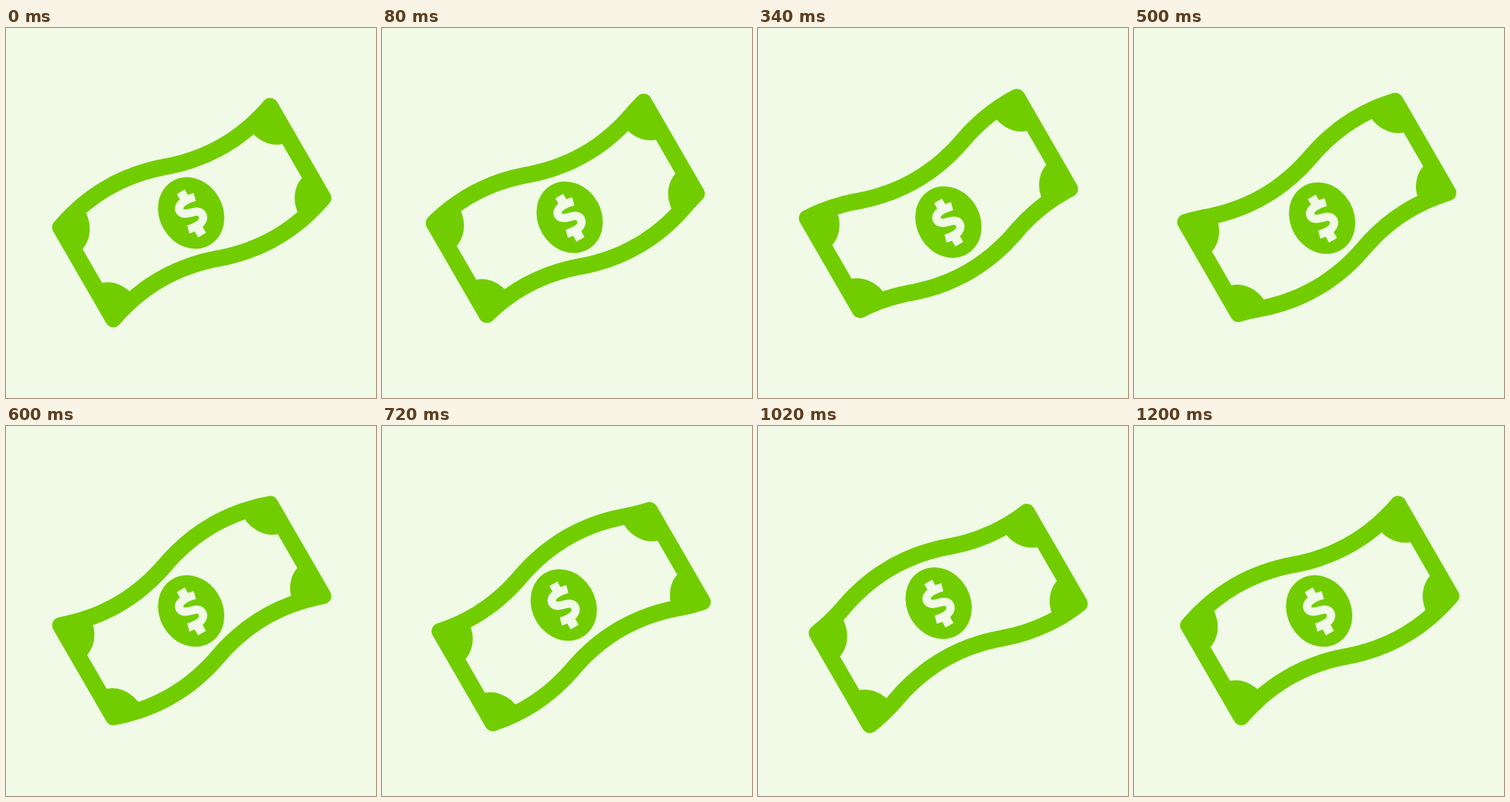
An HTML page for the animation above (1.22 s loop, 500 by 500 pixels).

```html
<!DOCTYPE html>
<html lang="en">
<head>
<meta charset="utf-8">
<title>Waving banknote</title>
<style>
  html, body { margin: 0; width: 100%; height: 100%; overflow: hidden; background: #f0fae6; }
  svg { display: block; width: 100vw; height: 100vh; }
</style>
</head>
<body>
<svg viewBox="0 0 500 500">
  <defs>
    <clipPath id="inside"><path id="clip"/></clipPath>
  </defs>
  <rect width="500" height="500" fill="#f0fae6"/>
  <g transform="translate(251 249.5) rotate(-30)">
    <g id="corners" clip-path="url(#inside)" fill="#72cd00"></g>
    <path id="border" fill="none" stroke="#72cd00" stroke-width="22.4" stroke-linejoin="round"/>
    <g id="coin">
      <ellipse rx="43" ry="50" fill="#72cd00"/>
      <path d="M15 -16.2C9 -17.8 5 -18.3 1 -18.3C-15 -18.3 -16 -5 -3.5 -1.5L4.5 .9C16 4 14 19 -1 19C-6 19 -10 18.6 -14.5 17.4"
            fill="none" stroke="#f0fae6" stroke-width="11.2"/>
      <path d="M-4 -31.8H8.3V-20H-4ZM-8.4 21H4V33.2H-8.4Z" fill="#f0fae6"/>
    </g>
  </g>
</svg>
<script>
const LOOP = 1220, STEP = 20, PERIOD = 1200;
const HALF_W = 163.6, HALF_H = 71.5, AMP = 14.5, SAMPLES = 80;
const $ = id => document.getElementById(id);

const corners = [[-1, -1], [1, -1], [1, 1], [-1, 1]].map(([sx, sy]) => {
  const el = document.createElementNS('http://www.w3.org/2000/svg', 'ellipse');
  el.setAttribute('rx', 40);
  el.setAttribute('ry', 46);
  el.setAttribute('cx', sx * HALF_W);
  $('corners').append(el);
  return { el, sx, sy };
});

// Travelling wave built from alternating parabolic arcs.
function wave(x, t) {
  const p = 2 * t / PERIOD + x / HALF_W + 2;
  const half = Math.floor(p), s = p - half;
  return (half % 2 ? -1 : 1) * 4 * AMP * s * (1 - s);
}

function edge(side, t) {
  const pts = [];
  for (let i = 0; i <= SAMPLES; i++) {
    const x = -side * HALF_W * (2 * i / SAMPLES - 1);
    pts.push(x.toFixed(2) + ' ' + (side * HALF_H + wave(x, t)).toFixed(2));
  }
  return pts;
}

function draw(t) {
  const d = 'M' + edge(-1, t).concat(edge(1, t)).join('L') + 'Z';
  $('border').setAttribute('d', d);
  $('clip').setAttribute('d', d);
  for (const { el, sx, sy } of corners)
    el.setAttribute('cy', sy * (HALF_H - 1) + 1.3 + wave(sx * (HALF_W - 20), t));
  $('coin').setAttribute('transform', `translate(-.9 ${wave(0, t)})`);
}

function tick() {
  draw(Math.floor(performance.now() % LOOP / STEP) * STEP);
  requestAnimationFrame(tick);
}
tick();
</script>
</body>
</html>
```
